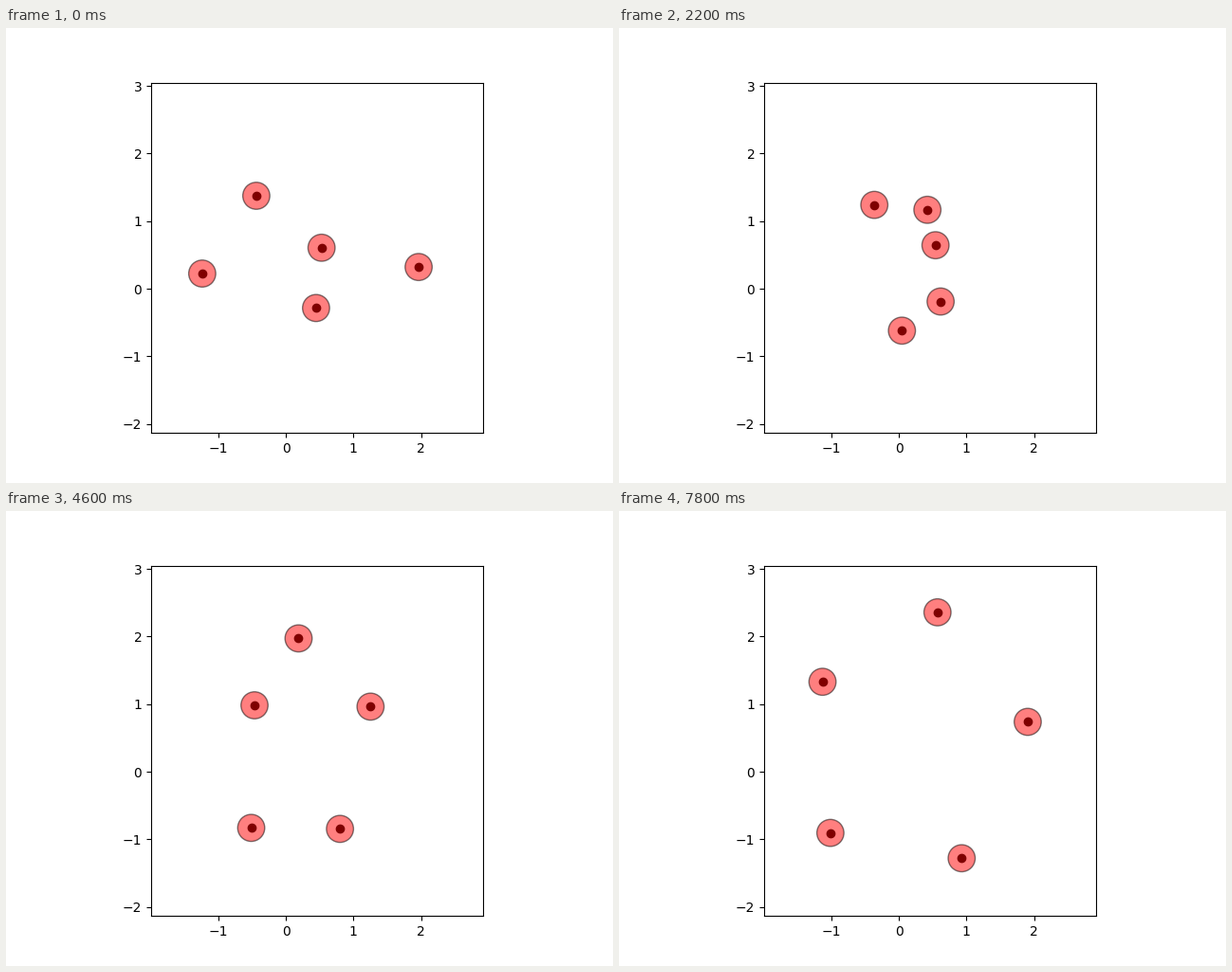
A matplotlib script that plays this animation: 640 by 480 pixels, repeating every 8000 ms.

```python
import matplotlib.pyplot as plt
import numpy as np
from matplotlib.animation import FuncAnimation
from matplotlib.patches import Circle

FRAMES, INTERVAL = 40, 200
DECAY = 0.95  # per step, the pace at which the agents settle into formation
CENTROID = np.array([0.253, 0.448])
RADIUS, HEADING = 2.2, np.radians(74.6)

# Start and three waypoints of four agents; the fifth keeps the centroid fixed.
STEPS = np.array([0, 7, 15, 31])
WAYPOINTS = np.array([
    [(-1.237, 0.224), (-0.437, 1.375), (0.528, 0.606), (0.447, -0.286)],
    [(-0.584, 0.898), (0.105, 1.198), (0.551, 0.104), (0.234, -0.502)],
    [(-0.175, 1.529), (0.723, 1.125), (0.687, -0.449), (-0.151, -0.715)],
    [(0.430, 2.231), (1.639, 0.829), (0.879, -1.111), (-0.798, -0.887)],
])
fifth = 5 * CENTROID - WAYPOINTS.sum(axis=1)

# The formation they approach is a regular pentagon.
angles = HEADING - np.arange(5) * 2 * np.pi / 5
pentagon = CENTROID + RADIUS * np.column_stack([np.cos(angles), np.sin(angles)])

PATH = np.concatenate([
    np.concatenate([WAYPOINTS, fifth[:, None]], axis=1),
    pentagon[None],
])
KNOTS = np.append(DECAY ** STEPS, 0)
SLOPES = np.gradient(PATH, KNOTS, axis=0)


def positions(step):
    """Cubic Hermite curve through the path, in exponentially decaying time."""
    i = np.searchsorted(STEPS, step, side="right") - 1
    h = KNOTS[i + 1] - KNOTS[i]
    u = (DECAY ** step - KNOTS[i]) / h
    a = (1 + 2 * u) * (1 - u) ** 2
    b = u * (1 - u) ** 2 * h
    c = u ** 2 * (u - 1) * h
    return (a * PATH[i] + (1 - a) * PATH[i + 1]
            + b * SLOPES[i] + c * SLOPES[i + 1])


fig, ax = plt.subplots(figsize=(6.4, 4.8), dpi=100)
ax.set_aspect("equal")
ax.set_xlim(-1.993, 2.917)
ax.set_ylim(-2.135, 3.05)
ax.set_xticks(range(-1, 3))
ax.set_yticks(range(-2, 4))

dots, = ax.plot([], [], "ko", markersize=6)
discs = [ax.add_patch(Circle((0, 0), 0.2, facecolor="red", edgecolor="black",
                             linewidth=1, alpha=0.5, zorder=3))
         for _ in range(5)]


def draw(step):
    points = positions(step)
    dots.set_data(points[:, 0], points[:, 1])
    for disc, point in zip(discs, points):
        disc.center = tuple(point)
    return [dots, *discs]


anim = FuncAnimation(fig, draw, frames=FRAMES, interval=INTERVAL, repeat=True)
plt.show()
```
